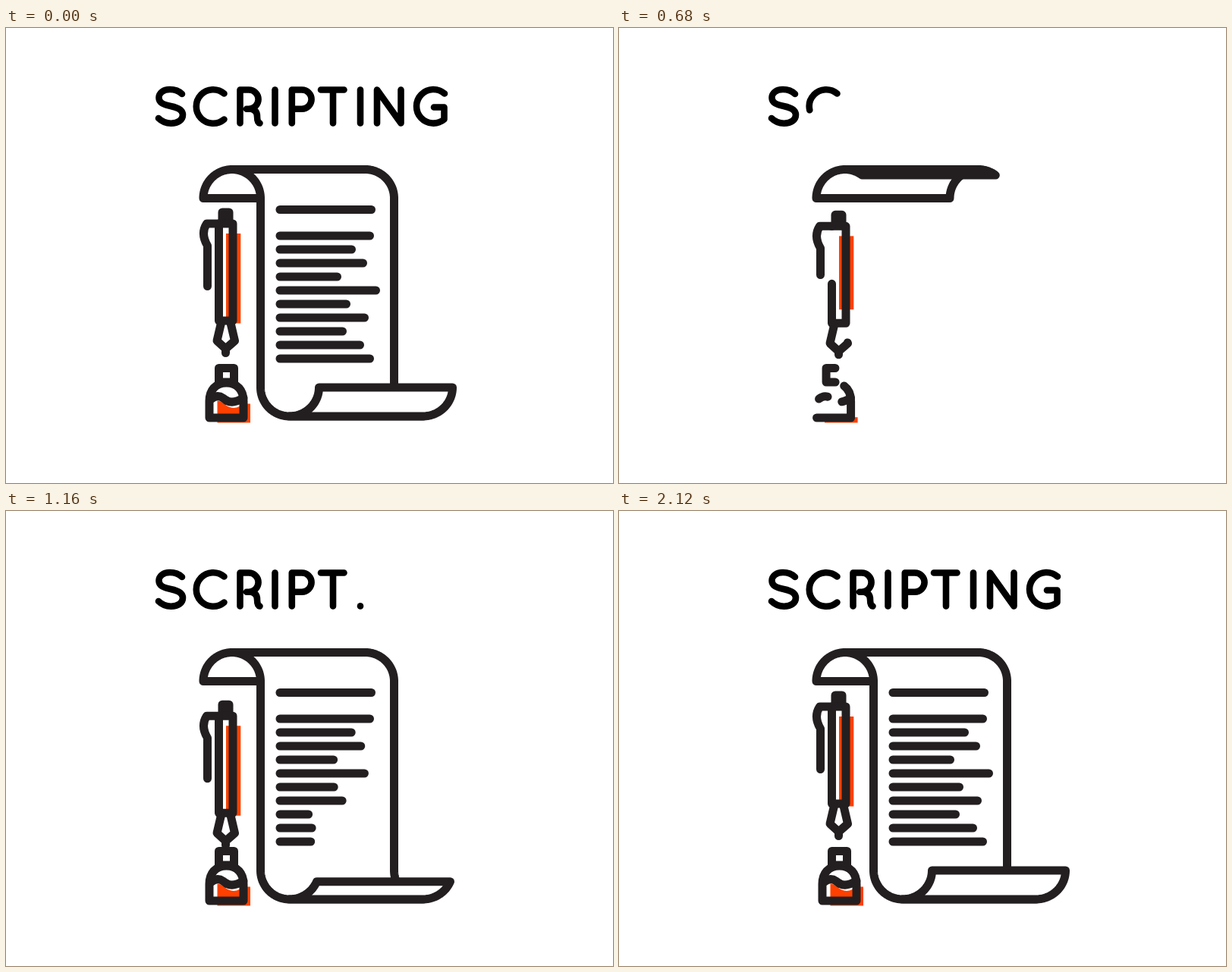
Write an HTML page that moves like this. It is 800 by 600 pixels and loops after 2440 ms.

```html
<!DOCTYPE html>
<html lang="en">
<head>
<meta charset="utf-8">
<title>Scripting</title>
<style>
  html, body { margin: 0; width: 100%; height: 100%; overflow: hidden; background: #fff; }
  svg { display: block; width: 800px; height: 600px; }
  path { fill: none; stroke: #231f20; stroke-width: 11; stroke-linecap: round; stroke-linejoin: round; }
  #title path { stroke: #000; stroke-width: 8.6; }
  #page path { fill: #fff; }
  .tint { fill: #ff4000; stroke: none; }
  #drop { fill: #e63a12; }
</style>
</head>
<body>
<svg viewBox="0 0 800 600" role="img" aria-label="SCRIPTING">
  <g id="title"></g>
  <g id="page"></g>
  <g id="lines"></g>
  <circle id="drop" cx="289.5" r="6.3"/>
  <g id="pen"><rect id="penTint" class="tint" x="290" y="271" width="19.3"/></g>
  <g id="bottle">
    <path id="ink" class="tint" d="M278.5 491.5Q283 491.5 288 496T300 501Q304 501 307.5 499L310 495.5H322V520.5H278.5Z"/>
  </g>
</svg>
<script>
const LOOP = 2440, STEP = 40, START = 360;
const $ = id => document.getElementById(id);
const clamp = p => Math.min(1, Math.max(0, p));
const ease = (t, start, length) => {
  const p = clamp((t - start) / length);
  return p * p * (3 - 2 * p);
};

function addPath(parent, d) {
  const el = document.createElementNS("http://www.w3.org/2000/svg", "path");
  if (d) el.setAttribute("d", d);
  $(parent).append(el);
  return el;
}

// Strokes that draw themselves from their first point.
const strokes = [];
function stroke(parent, start, length, d) {
  const el = addPath(parent, d);
  el.setAttribute("pathLength", 1);
  strokes.push({ el, start, length });
}
function trim(el, p) {
  el.style.display = p > 0 ? "" : "none";
  el.style.strokeDasharray = p < 1 ? `${p} 2` : "none";
}

// Title letters
[
  [475, "M232 87C228 83 223 81 216 81C207 81 201.5 86 201.5 92C201.5 99 208 101 217 103C227 105 233 108 233 114.5C233 121 227 125.7 217.5 125.7C210 125.7 205 123 201 119"],
  [595, "M287.5 86.5A22.3 22.3 0 1 0 287.5 120.5"],
  [716, "M308.5 125.5V81.5H320A12.6 12.6 0 0 1 320 106.7H317M322 106.5Q331 108 331 116.5Q331 125 334.5 125.5"],
  [836, "M354.5 125.5V81.5"],
  [957, "M376.8 125.5V81.5H390A12.6 12.6 0 0 1 390 106.7H378"],
  [1056, "M415 81.5H445.5M431 81.5V125.5"],
  [1154, "M467 125.5V81.5"],
  [1253, "M489 125.5V81.5L520.5 125.5V81.5"],
  [1352, "M578 86.5A22.3 22.3 0 1 0 577.5 120.5V104.5H564"]
].forEach(([start, d]) => stroke("title", start, 160, d));

// Lines of writing: [y, right end]
[
  [239.5, 481.5], [274, 479.5], [292, 455.5], [310, 470.5], [328, 436.5], [346, 487.5],
  [364, 448.5], [382, 472.5], [400, 443.5], [418, 466.5], [436, 479.5]
].forEach(([y, end], i) => {
  const late = i - 8;
  stroke("lines", late < 0 ? 711 + 25 * i : 1000 + 13 * late, late < 0 ? 413 : 340, `M361 ${y}H${end}`);
});

stroke("pen", 400, 385, "M285 256V243H294V256Z");
stroke("pen", 400, 420, "M280.5 258H299V386H280.5Z");
stroke("pen", 400, 385, "M280.5 258H264.5Q256 271 265.5 287V340.5");
stroke("pen", 400, 435, "M283.5 389L278 412.5L289.5 423L301.5 412.5L296 389");
stroke("pen", 400, 385, "M289.5 423V428.5");

stroke("bottle", 440, 450, "M292.5 467H280.5V448.5H300.5V467Z");
stroke("bottle", 440, 450, "M268 514H313V492C313 478 305 468 290.5 468S268 478 268 492Z");
stroke("bottle", 440, 450, "M271 489C276 485 281 484.5 286 488L291 491.5");
stroke("bottle", 440, 450, "M313 488C303 493.5 297 494.5 291 491.5");

// The sheet is a horizontal edge swept along one curve, in three layers: back flap, front, bottom curl.
const layers = [
  "M260 224.5A38 38 0 0 1 298 186.5",
  "M298 186.5A38 38 0 0 1 335.5 224.5V474A38 38 0 0 0 373.5 512",
  "M373.5 512A39 38 0 0 0 412.5 474"
].map(d => {
  const el = addPath("page", d);
  const curve = el.cloneNode();
  return { el, curve, size: curve.getTotalLength() };
});
const sheetLength = layers.reduce((sum, layer) => sum + layer.size, 0);

function drawSheet(t) {
  let left = sheetLength * ease(t, 480, 760);
  const width = 176 * ease(t, 380, 180);
  for (const { el, curve, size } of layers) {
    const end = Math.min(left, size), near = [], far = [];
    el.style.display = end > 0 ? "" : "none";
    if (end > 0) {
      const count = Math.ceil(end / 2);
      for (let i = 0; i <= count; i++) {
        const { x, y } = curve.getPointAtLength(end * i / count);
        near.push(`${x} ${y}`);
        far.unshift(`${x + width} ${y}`);
      }
      el.setAttribute("d", `M${near.concat(far).join("L")}Z`);
    }
    left -= end;
  }
}

function draw(t) {
  strokes.forEach(({ el, start, length }) => trim(el, ease(t, start, length)));
  drawSheet(t);

  const dip = 21 * (t < 1320 ? ease(t, 960, 360) : 1 - ease(t, 1320, 720));
  const penY = 13 * (1 - ease(t, 400, 420)) + dip;
  $("pen").setAttribute("transform", `translate(0 ${penY})`);
  $("penTint").setAttribute("height", 118.5 * ease(t, 400, 385));

  $("bottle").setAttribute("transform", `translate(${-16.5 * (1 - ease(t, 440, 450))} 0)`);
  const fill = ease(t, 560, 340);
  $("ink").setAttribute("transform", `translate(0 ${520.5 * (1 - fill)}) scale(1 ${fill})`);

  // The drop hangs on the nib, then falls into the bottle.
  const fall = clamp((t - 1720) / 360);
  const hang = 431 + 21 * (1 - ease(Math.min(t, 1720), 1320, 720));
  $("drop").setAttribute("cy", hang + (508 - hang) * fall * fall);
  $("drop").style.display = t >= 1280 && t < 2080 ? "" : "none";
}

function tick() {
  const t = Math.floor(performance.now() % LOOP / STEP) * STEP;
  draw(t < START ? LOOP : t);
  requestAnimationFrame(tick);
}
tick();
</script>
</body>
</html>
```
